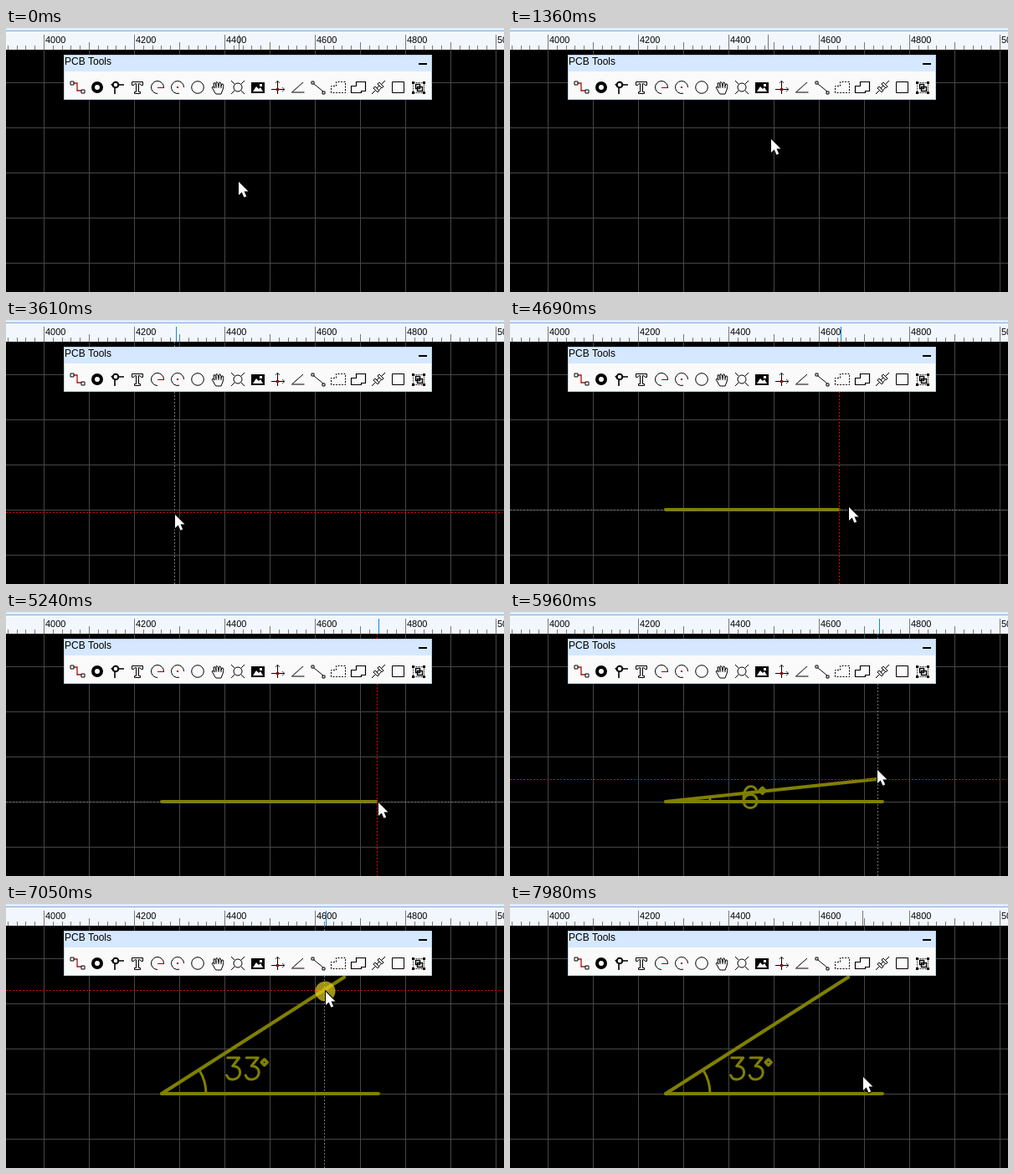
These frames come from a looping animation (595x316 px, 8 s). An HTML page with a canvas:

```html
<!DOCTYPE html>
<html lang="en">
<head>
<meta charset="utf-8">
<title>Protractor tool</title>
<style>
  html, body { margin: 0; height: 100%; overflow: hidden; background: #000; }
  canvas { display: block; }
</style>
</head>
<body>
<canvas id="stage" width="595" height="316"></canvas>
<script>
const ctx = document.getElementById('stage').getContext('2d');
const LOOP = 8000, OLIVE = '#808000';
const ORIGIN = { x: 186, y: 227 }, ARM = 259;

// time, x, y of the pointer; power of the ease-out leading there (0 = smoothstep)
const POINTER = [
  [1000, 278, 184, 1], [1730, 348, 81, 0],
  [3030, 348, 81, 1], [3610, 202, 233, 0], [3760, 186, 229, 2],
  [4300, 186, 229, 1], [4940, 444, 223, 2],
  [5060, 444, 223, 1], [5240, 445, 228, 2],
  [5870, 445, 228, 1], [5960, 439.5, 189, 1], [6670, 382, 105, 2],
  [7480, 382, 105, 1], [7670, 382, 112, 2],
  [7760, 382, 112, 1], [7980, 422, 207, 2],
];
const CLICKS = [[340, 490], [4070, 4150], [5470, 5640], [7050, 7210]];

// stroke font, 16 x 26 units per digit
const DIGITS = [
  'M8 0C2 0 0 6 0 13S2 26 8 26 16 20 16 13 14 0 8 0Z',
  'M4 5L10 0V26',
  'M0 6C0-2 16-2 16 6 16 12 6 18 0 26H16',
  'M1 0H15L7 10C19 9 19 26 7 26 3 26 1 24 0 21',
  'M12 26V0L0 18H16',
  'M14 0H2L1 12C6 7 16 9 16 17 16 28 3 29 0 21',
  'M15 4C10-3 0 0 0 14V18C0 29 16 29 16 18S0 8 0 18',
  'M0 0H16L5 26',
  'M8 0C-1 0-1 11 8 11S17 0 8 0ZM8 11C-3 11-3 26 8 26S19 11 8 11Z',
  'M1 22C6 29 16 26 16 12V8C16-3 0-3 0 8S16 18 16 8',
].map(d => new Path2D(d));

const ARROW = new Path2D('M0 0V16L3.7 12.6 6.5 18.8 9.2 17.6 6.5 11.6H11.5Z');
const HAND = new Path2D('M-1 1Q1-1 3 1V8Q5 7 6 9 8 8 9 10 12 9 12 12V17Q11 20 10 23H1Q-1 19-5 14-5 11-1 13Z');

// toolbar icons around their centre: drawn 24 px apart
const ICONS = [
  () => { stroke('M-4-5H0V4H5', '#b01010', 1.3); stroke('M-8-7h4v4h-4zM5 3h4v4h-4z'); },
  () => circle(0, 0, 5, 4),
  () => { circle(-2, -3, 3.3, 2); stroke('M1.5-3H8M-4.5-.5L-7-4M-3 1V8', '#000', 1.6); },
  () => stroke('M-6.500-6.500H6.500V-2.500H4.500Q4-4.500 1.500-4.500V5.500H3.500V7.500H-3.500V5.500H-1.500V-4.500Q-4-4.500-4.500-2.500H-6.500Z'),
  () => { stroke('M7.500 0A7.500 7.500 0 1 0 0 7.500'); stroke('M0 .5H8', '#900'); },
  () => { stroke('M7.500 0A7.500 7.500 0 1 0 2 7.200'); fill('M-1-1h2v2h-2z', '#900'); },
  () => circle(0, 0, 7.3),
  () => stroke('M-3 7L-7 0Q-6-2-4 1L-5-5Q-3-7-2-1V-6Q0-8 1-1L2-6Q4-7 4-1L5-4Q8-5 6 3L4 8H-2ZM-2-1V1M1-1V1M4-1V1'),
  () => { circle(0, 0, 5); stroke('M-8-8L-3.500-3.500M8-8L3.500-3.500M-8 8L-3.500 3.500M8 8L3.500 3.500'); },
  () => { fill('M-8-6H8V7H-8Z'); fill('M-6 5L-2-1 1 2 3 0 6 5ZM2-4h3v3h-3z', '#fff'); },
  () => { stroke('M-.5-8V8M-8 2.500H8'); stroke('M-3-5L-.5-8 2-5M5 0L8 2.500 5 5', '#444'); fill('M-2 1h3v3h-3z', '#900'); },
  () => stroke('M7.500 6H-7.500L6-6'),
  () => { stroke('M-5-4L6 5'); stroke('M-8-7h3v3h-3zM5 5h3v3h-3z'); },
  () => stroke('M-8.500 6.500V-1.500H-2.500V-6.500H8.500V6.500Z', '#000', 1, [2, 1.5]),
  () => stroke('M-8.500 6.500V-1.500H-2.500V-6.500H8.500V4.500H3.500V6.500Z', '#000', 1.2),
  () => { stroke('M-8 8L-4 4M4-4L8-8M-6 1L-1 6 1 4-4-1ZM-1-4L4 1 6-1 1-6Z'); stroke('M-2 1L1-2M1 3L3 1'); },
  () => stroke('M-7.500-6.500H6.500V6.500H-7.500Z'),
  () => { stroke('M-6.500-5.500H6.500V6.500H-6.500Z', '#444', 1, [2, 1]); stroke('M-3.500-3.500H1.500V1.500H-3.500ZM-1.500-.5H4.500V4.500H-1.500Z', '#000', 1.4);
          fill('M-8-7h3v3h-3zM5-7h3v3h-3zM-8 5h3v3h-3zM5 5h3v3h-3z'); },
];

function stroke(path, color = '#000', width = 1, dash = []) {
  ctx.strokeStyle = color;
  ctx.lineWidth = width;
  ctx.setLineDash(dash);
  ctx.stroke(path instanceof Path2D ? path : new Path2D(path));
  ctx.setLineDash([]);
}

function fill(path, color = '#000') {
  ctx.fillStyle = color;
  ctx.fill(path instanceof Path2D ? path : new Path2D(path));
}

function circle(x, y, r, width = 1) {
  const ring = new Path2D();
  ring.arc(x, y, r, 0, 7);
  stroke(ring, '#000', width);
}

function rect(x, y, w, h, color) {
  ctx.fillStyle = color;
  ctx.fillRect(x, y, w, h);
}

function text(label, x, y, font, color = '#000') {
  ctx.font = font;
  ctx.fillStyle = color;
  ctx.fillText(label, x, y);
}

function at(x, y, draw) {
  ctx.save();
  ctx.translate(x, y);
  draw();
  ctx.restore();
}

function pointerAt(t) {
  const i = POINTER.findIndex(key => key[0] > t);
  const [t1, x1, y1, power] = POINTER.at(i);
  if (i <= 0) return { x: i ? x1 : POINTER[0][1], y: i ? y1 : POINTER[0][2] };
  const [t0, x0, y0] = POINTER[i - 1];
  const u = (t - t0) / (t1 - t0);
  const e = power ? 1 - (1 - u) ** power : u * u * (3 - 2 * u);
  return { x: x0 + (x1 - x0) * e, y: y0 + (y1 - y0) * e };
}

function crossAt(t) {
  const p = pointerAt(t - 30);
  return { x: Math.round(p.x) - 2, y: t > 4150 && t < 5640 ? ORIGIN.y : Math.round(p.y) - 2 };
}

function drawGrid() {
  rect(0, 0, 595, 316, '#000');
  for (let x = 45; x < 595; x += 54) rect(x, 26, 1, 290, '#464646');
  for (let y = 65; y < 316; y += 54) rect(0, y, 595, 1, '#464646');
}

function drawRuler(markX, active) {
  rect(0, 0, 595, 26, '#f2f7fd');
  rect(0, 0, 595, 3, '#e0ecf9');
  rect(0, 3, 595, 1, '#7fb0e0');
  for (let i = -4; i < 51; i++) {
    const top = i % 10 ? (i % 5 ? 21 : 17) : 8;
    rect(Math.round(45 + i * 10.8), top, 1, 26 - top, '#777');
  }
  rect(Math.round(markX), 8, 1, 18, active ? '#0a8be0' : '#777');
  for (let i = 0; i < 6; i++) text(4000 + i * 200, 47 + i * 108, 18, '11px "Liberation Sans", Arial, sans-serif');
}

function drawAngle(t) {
  const end = crossAt(Math.min(t, 7050));
  const line = (x, y) => stroke(`M${ORIGIN.x} ${ORIGIN.y}L${x} ${y}`, OLIVE, 4);
  ctx.lineCap = ctx.lineJoin = 'round';
  line(t < 5640 ? Math.max(ORIGIN.x, end.x) : ORIGIN.x + ARM, ORIGIN.y);
  if (t >= 5640) {
    const angle = Math.atan2(ORIGIN.y - end.y, end.x - ORIGIN.x);
    const polar = (r, a) => [ORIGIN.x + r * Math.cos(a), ORIGIN.y - r * Math.sin(a)];
    line(...polar(ARM, angle));
    const arc = new Path2D();
    arc.arc(ORIGIN.x, ORIGIN.y, 53, -angle, 0);
    stroke(arc, OLIVE, 3);

    const digits = String(Math.max(0, Math.round(angle * 180 / Math.PI)));
    const [cx, cy] = polar(107, angle / 2);
    at(cx - digits.length * 11.25 - 2.5, cy - 13, () => {
      for (const d of digits) {
        stroke(DIGITS[d], OLIVE, 3);
        ctx.translate(22.5, 0);
      }
      stroke('M0 2L3.500 5.500 0 9-3.500 5.500Z', OLIVE, 3.5);
    });
  }
  ctx.lineCap = 'butt';
  ctx.lineJoin = 'miter';
}

function drawCross({ x, y }, drawingBase) {
  const [across, down] = drawingBase ? ['#777', '#e00000'] : ['#e00000', '#777'];
  stroke(`M0 ${y + .5}H593`, across, 1, [2, 2]);
  stroke(`M${x + .5} 26V316`, down, 1, [2, 2]);
}

function drawToolbar(hover) {
  rect(69, 32, 440, 54, '#b8cfe6');
  rect(70, 33, 438, 19, '#d6e8ff');
  rect(70, 52, 438, 33, '#fafafa');
  text('PCB Tools', 70, 44, '12px "Liberation Sans", Arial, sans-serif');
  rect(493, 42, 10, 2, '#000');
  if (hover) rect(337, 58, 24, 24, '#add8e6');
  ICONS.forEach((draw, i) => at(85 + i * 24, 71, draw));
}

function drawTooltip(alpha) {
  ctx.globalAlpha = alpha;
  rect(349, 108, 88, 25, 'rgba(0,0,0,.4)');
  rect(347, 106, 88, 25, '#767676');
  rect(348, 107, 86, 23, '#fff');
  text('Protractor', 353, 124, '15.5px "Noto Sans", "Open Sans", sans-serif', '#505050');
  ctx.globalAlpha = 1;
}

function drawPointer(p, t, overTools) {
  if (CLICKS.some(([on, off]) => t >= on && t < off)) {
    ctx.fillStyle = 'rgba(235,215,30,.68)';
    ctx.beginPath();
    ctx.arc(p.x - .5, p.y - .5, 12, 0, 7);
    ctx.fill();
  }
  at(Math.round(p.x), Math.round(p.y), () => {
    const shape = overTools ? HAND : ARROW;
    stroke(shape, '#000', 2);
    fill(shape, '#fff');
    if (overTools) stroke('M3 8V13M6 9V13M9 10V13');
  });
}

function draw(t) {
  const pointer = pointerAt(t);
  const overTools = pointer.y < 86;
  const hover = overTools && Math.abs(pointer.x - 349) < 12;
  const toolActive = t >= 3060 && t < 7590 && !overTools;
  drawGrid();
  if (t >= 4150) drawAngle(t);
  if (toolActive) drawCross(crossAt(t), t > 4150 && t < 5640);
  drawRuler(pointerAt(t - 30).x, toolActive);
  drawToolbar(hover);
  if (hover && t >= 2280) drawTooltip(Math.min(1, Math.ceil((t - 2279) / 85) / 3));
  drawPointer(pointer, t, overTools);
}

const start = performance.now();
(function tick() {
  draw((performance.now() - start) % LOOP);
  requestAnimationFrame(tick);
})();
</script>
</body>
</html>
```
